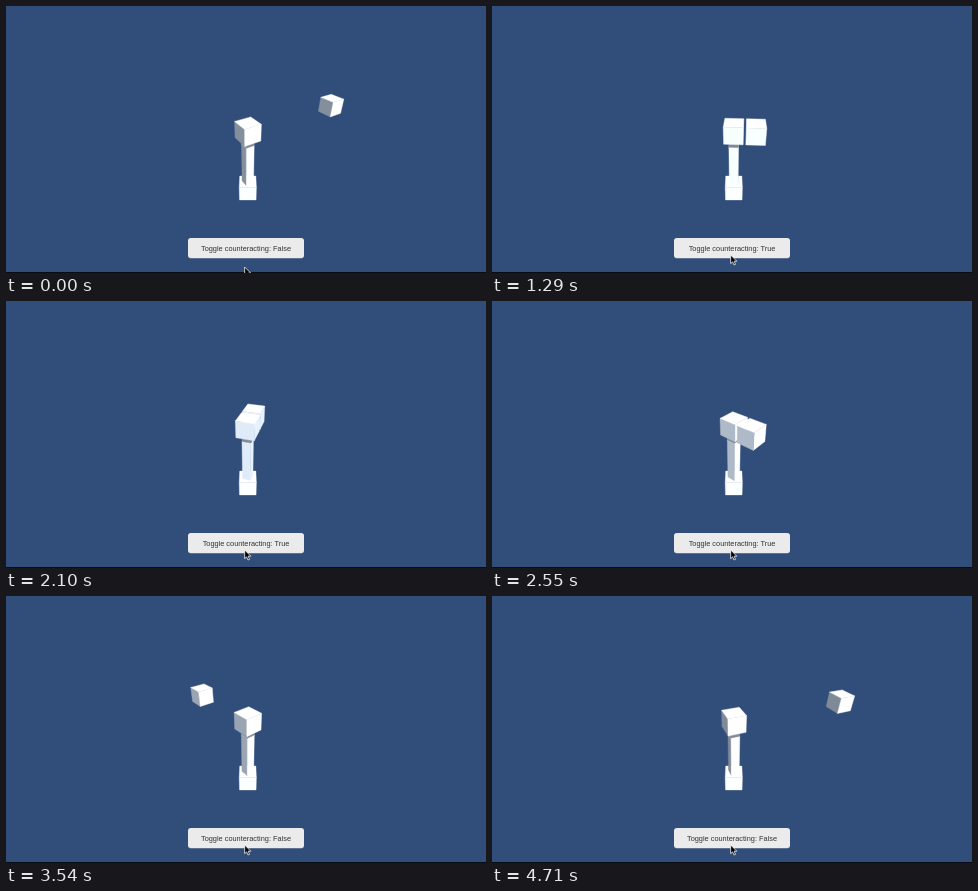
Animation of 480x267 px, one loop 4.74 s. Source, as an HTML page with a canvas:

```html
<!DOCTYPE html>
<html lang="en">
<head>
<meta charset="utf-8">
<title>Orbiting cube</title>
<style>
  html, body { margin: 0; width: 100%; height: 100%; overflow: hidden; background: #314d79; }
  canvas { display: block; }
  #toggle {
    position: absolute; left: 182px; top: 232px; width: 116px; height: 20px;
    border-radius: 3px; background: #ebebeb; box-shadow: 0 .5px .5px #8b98ad;
    font: 7.36px/21px "Liberation Sans", Arial, sans-serif;
    color: #323232; text-align: center; white-space: nowrap;
  }
  #cursor { position: absolute; left: 238px; top: 0; }
  #floor { position: absolute; left: 0; top: 266px; width: 480px; height: 1px; background: #080c14; }
</style>
</head>
<body>
<canvas id="view" width="480" height="267"></canvas>
<div id="toggle"></div>
<div id="floor"></div>
<svg id="cursor" width="10" height="13" viewBox="0 0 9 12">
  <path d="M.5 .5V8.4L2.3 6.8L3.6 9.7L5 9.1L3.7 6.2H6.2Z" fill="#000" stroke="#fff" stroke-width=".7"/>
</svg>
<script>
const LOOP = 4740, STEP = 30;
const TOGGLE_ON = 900, TOGGLE_OFF = 2790;

const ctx = document.getElementById('view').getContext('2d');
const label = document.getElementById('toggle');
const cursor = document.getElementById('cursor');

// Camera pitched 30 degrees, aimed at the spinning top cube
const FOCAL = 226, DIST = 11.85, SIN = 0.5, COS = Math.sqrt(0.75);
const CX = 241.8, CY = 125.3;
const EYE = [0, DIST * SIN, -DIST * COS];
const LIGHT = [0.32, 0.766, -0.557];
const AMBIENT = [127, 138, 153];

// [time, heading in degrees]
const TURN = [[0, 32], [600, 348], [1290, 717], [2100, 1153], [2970, 1630], [4050, 2200], [4740, 2556]];

const dot = (a, b) => a[0] * b[0] + a[1] * b[1] + a[2] * b[2];
const clamp = x => Math.min(1, Math.max(0, x));
const smooth = x => (x = clamp(x), x * x * (3 - 2 * x));

function heading(t) {
  let i = 1;
  while (t > TURN[i][0]) i++;
  const [t0, a0] = TURN[i - 1], [t1, a1] = TURN[i];
  return (a0 + (a1 - a0) * (t - t0) / (t1 - t0)) * Math.PI / 180;
}

function radius(t) {
  const near = 1.15, far = 8.1;
  if (t < 1200) {
    const out = far - 1.7 * Math.exp(-t / 620);
    return out + (near - out) * smooth((t - TOGGLE_ON) / 300);
  }
  return far - (far - near) * Math.exp(-Math.max(0, t - 2860) / 1000);
}

function project([x, y, z]) {
  const k = FOCAL / (DIST + z * COS - y * SIN);
  return [CX + x * k, CY - (y * COS + z * SIN) * k];
}

function face(points, normal, shaded) {
  const p = points[0];
  if (dot(normal, [EYE[0] - p[0], EYE[1] - p[1], EYE[2] - p[2]]) <= 0) return;
  const lit = shaded ? 0 : Math.max(0, dot(normal, LIGHT)) * 222;
  ctx.fillStyle = ctx.strokeStyle = `rgb(${AMBIENT.map(c => Math.min(255, Math.round(c + lit)))})`;
  ctx.beginPath();
  for (const q of points) ctx.lineTo(...project(q));
  ctx.closePath();
  ctx.fill();
  ctx.stroke(); // closes the seams between faces
}

// Upright box turned by yaw around its own centre
function box(x, z, bottom, top, width, yaw, shaded) {
  const r = width * Math.SQRT1_2;
  const corner = (i, y) => {
    const a = yaw + Math.PI / 4 + i * Math.PI / 2;
    return [x + r * Math.cos(a), y, z + r * Math.sin(a)];
  };
  for (let i = 0; i < 4; i++) {
    const a = yaw + i * Math.PI / 2;
    face([corner(i - 1, bottom), corner(i, bottom), corner(i, top), corner(i - 1, top)],
         [Math.cos(a), 0, Math.sin(a)], shaded);
  }
  face([0, 1, 2, 3].map(i => corner(i, top)), [0, 1, 0], shaded);
}

function draw(t) {
  const yaw = heading(t), r = radius(t);
  const x = r * Math.cos(yaw), z = r * Math.sin(yaw);
  const satellite = () => box(x, z, -0.5, 0.5, 1, yaw);

  ctx.fillStyle = '#314d79';
  ctx.fillRect(0, 0, 480, 267);
  ctx.lineWidth = 0.4;
  ctx.lineJoin = 'round';
  if (z > 0) satellite();
  box(0, 0, -4.5, -3.5, 1, 0);
  box(0, 0, -3.5, -0.84, 0.5, yaw);
  box(0, 0, -0.84, -0.5, 0.5, yaw, true);
  box(0, 0, -0.5, 0.5, 1, yaw);
  if (z <= 0) satellite();

  const on = t >= TOGGLE_ON && t < TOGGLE_OFF;
  label.textContent = 'Toggle counteracting: ' + (on ? 'True' : 'False');
  cursor.style.transform = `translateY(${260.5 - 12 * smooth(t / 300)}px)`;
}

function tick(now) {
  draw(Math.floor(now % LOOP / STEP) * STEP);
  requestAnimationFrame(tick);
}
draw(0);
requestAnimationFrame(tick);
</script>
</body>
</html>
```
